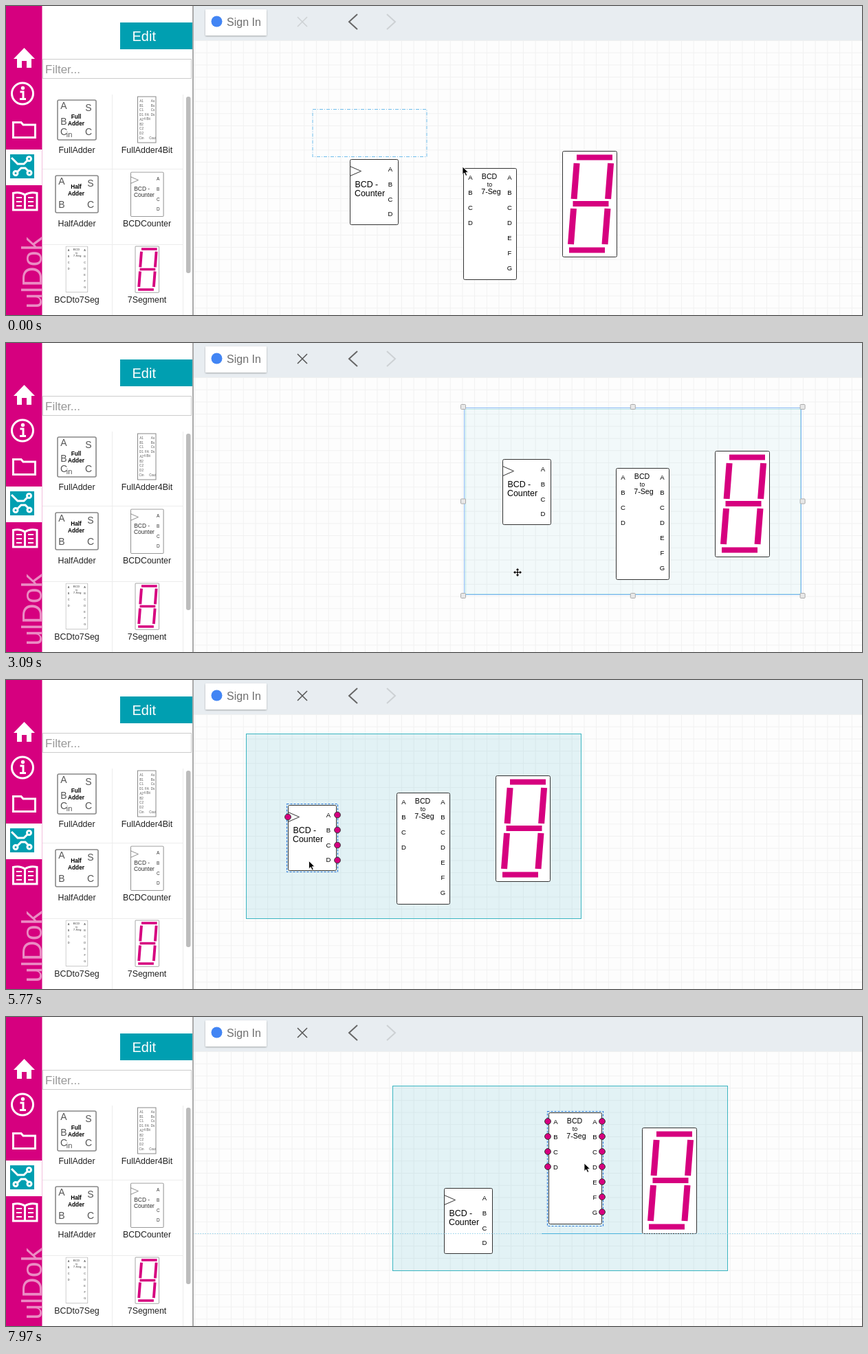
Recreate the animation shown at these times as an HTML page. Size 1245 by 450 pixels, loop 8000 ms.

```html
<!DOCTYPE html>
<html lang="en">
<head>
<meta charset="utf-8">
<title>Circuit editor</title>
<style>
html, body { margin: 0; width: 100%; height: 100%; overflow: hidden; background: #fff; }
svg { display: block; width: 1245px; height: 450px; font-family: "Liberation Sans", Arial, sans-serif; }
.mid { text-anchor: middle; }
.line { fill: none; stroke: #fff; stroke-width: 3; }
.box { fill: #fff; stroke: #333; }
.icon { fill: #fff; stroke: #888; stroke-width: 1.6; }
.port { fill: #d6007f; stroke: #333; }
.dash { fill: none; stroke: #2a78d8; stroke-width: 1.2; stroke-dasharray: 3 2; }
</style>
</head>
<body>
<svg viewBox="0 0 1245 450">
  <defs>
    <pattern id="grid" x="274" y="50" width="17.7" height="17.7" patternUnits="userSpaceOnUse">
      <path d="M.5 0V17.7M0 .5H17.7" stroke="#f1f1f1" fill="none"/>
    </pattern>
    <filter id="shadow" x="-10%" y="-10%" width="120%" height="130%">
      <feDropShadow dx="0" dy="1" stdDeviation="1.2" flood-opacity=".3"/>
    </filter>
    <g id="counter"></g>
    <g id="decoder"></g>
    <g id="display"></g>
  </defs>

  <rect x="272" width="973" height="450" fill="#fdfdfd"/>
  <rect x="272" y="50" width="973" height="400" fill="url(#grid)"/>

  <g id="group">
    <rect id="groupArea" x=".5" y=".5" width="487" height="269" fill="#0a9cb8" stroke="#3bb5c1"/>
    <g id="counterNode"><use href="#counter"/><g id="counterMarks"></g></g>
    <g id="decoderNode"><use href="#decoder"/><rect id="decoderDash" class="dash" x="-2" y="-2" width="81" height="167"/><g id="decoderPorts"></g></g>
    <use href="#display" x="363.5" y="61.5"/>
    <g id="frame"><rect x="-1.5" y="-1.5" width="490" height="272" fill="none" stroke="#80b6f2"/></g>
  </g>
  <rect id="band" x="446" y="150.5" fill="none" stroke="#6fbdec" stroke-dasharray="5 2 1 2"/>
  <g id="guide" stroke="#8fd0ea">
    <path d="M272 0H1244" stroke-dasharray="1.5 2"/>
    <path id="guideSpan" stroke="#4bb4de"/>
  </g>

  <rect x="272" width="973" height="50" fill="#e8edf1"/>
  <rect x="290" y="5" width="89" height="38" rx="1" fill="#fff" filter="url(#shadow)"/>
  <circle cx="306.5" cy="22.5" r="8" fill="#4285f4"/>
  <text x="321" y="29" font-size="16" fill="#6e6e6e">Sign In</text>
  <path id="remove" d="M424 16L438 30M438 16L424 30" stroke-width="1.5"/>
  <path d="M511 12L499 23L511 34" fill="none" stroke="#666" stroke-width="2"/>
  <path d="M554 12L566 23L554 34" fill="none" stroke="#cdd1d4" stroke-width="2"/>

  <rect x="52" width="220" height="450" fill="#fff"/>
  <path d="M272 0V450" stroke="#aaa" stroke-width="2"/>
  <rect x="166" y="24" width="105" height="39" fill="#009fb1"/>
  <text x="183.5" y="51" font-size="20" fill="#fff">Edit</text>
  <rect x="53.5" y="77.5" width="216" height="28" fill="#fff" stroke="#ccc"/>
  <text x="57" y="98" font-size="17" fill="#999">Filter...</text>
  <path d="M154.5 129V450M257.5 129V450M53 237.5H257M53 347.5H257" stroke="#ececec"/>
  <rect x="262" y="132" width="6.5" height="257" rx="3" fill="#bcbcbc"/>
  <g id="palette"></g>

  <rect width="52.5" height="450" fill="#d6007f"/>
  <path d="M11 77L26.5 61L42 77H37V90H30V80H23V90H16V77Z" fill="#fff"/>
  <circle class="line" cx="24" cy="127.5" r="15.5"/>
  <path class="line" stroke-width="4" d="M20.5 125H25V135M20 135.5H29"/>
  <circle cx="24.5" cy="119.5" r="2.7" fill="#fff"/>
  <path class="line" d="M10.5 190V169.5H22L25 173H42.5V191.5H10.5Z"/>
  <rect y="209" width="52.5" height="52" fill="#fff"/>
  <rect x="6" y="216" width="35" height="35" fill="#009fb1"/>
  <g class="line">
    <path d="M8 221L17 230H26L31 225M17 241L22 236H28L32 240"/>
    <circle cx="33.5" cy="222.5" r="3"/><circle cx="14" cy="243.5" r="3"/><circle cx="34" cy="243" r="3"/>
  </g>
  <path class="line" d="M27.5 275Q20 270 10.5 272.5V297H45V272.5Q35 270 27.5 275V297"/>
  <path stroke="#fff" stroke-width="2" d="M15 279H23M15 285H23M15 291H23M32 279H40M32 285H40M32 291H40"/>
  <text transform="translate(52 336) rotate(-90)" text-anchor="end" font-size="41" fill="#eb8cc4">ulDok</text>

  <path id="arrow" stroke="#fff" stroke-width=".8" d="M0 0V11.5L2.7 9L4.7 13.3L6.7 12.4L4.8 8.3H8.5Z"/>
  <path id="mover" stroke="#fff" stroke-width=".8" d="M0-6.5L3-3H1V-1H3V-3L6.5 0L3 3V1H1V3H3L0 6.5L-3 3H-1V1H-3V3L-6.5 0L-3-3V-1H-1V-3H-3Z"/>
</svg>
<script>
const $ = id => document.getElementById(id);
const add = (id, markup) => $(id).insertAdjacentHTML('beforeend', markup);
const repeat = (count, make) => Array.from({ length: count }, (_, i) => make(i)).join('');
const label = (text, x, y, size, extra = '') =>
  `<text class="mid" x="${x}" y="${y}" font-size="${size}" ${extra}>${text}</text>`;
const column = (items, x, y, step, size) =>
  repeat(items.length, i => label(items[i], x, y + i * step, size));
const ports = (count, x, y) =>
  repeat(count, i => `<circle class="port" cx="${x}" cy="${y + i * 22}" r="4.4"/>`);

// Chips
add('counter', `<rect class="box" width="70" height="95" rx="2"/>
  <path d="M0 10L16 17L0 24" fill="none" stroke="#333"/>
  <text x="7" y="40" font-size="12.4">BCD -</text><text x="6.5" y="53" font-size="12.4">Counter</text>`
  + column('ABCD', 58.5, 17.5, 21.8, 9.5));
add('counterMarks', '<rect class="dash" x="-2" y="-2" width="74" height="99"/>'
  + ports(1, -.5, 17) + ports(4, 71.5, 14));
add('decoder', '<rect class="box" width="77" height="162" rx="2"/>'
  + label('BCD', 37.5, 15, 10.6) + label('to', 38, 26.5, 8.8) + label('7-Seg', 40, 37.5, 10.6)
  + column('ABCD', 10, 16.5, 22, 9.5) + column('ABCDEFG', 67, 16.8, 22, 9.5));
add('decoderPorts', ports(4, -1.5, 12.5) + ports(7, 77.5, 12.5));

const bars = repeat(3, i => `M${20.5 - 5.5 * i} ${9 + 67.5 * i}h52`);
const posts = repeat(4, i => {
  const row = i >> 1, col = i % 2;
  return `M${20.6 - 4.6 * row + 49.5 * col} ${17.5 + 66 * row}l-4 52`;
});
add('display', `<rect class="box" width="79" height="154" rx="2"/>
  <g fill="none" stroke="#d6007f"><path stroke-width="8" d="${bars}"/><path stroke-width="9" d="${posts}"/></g>`);

// Eight resize handles around the group
add('frame', repeat(9, i => i === 4 ? '' :
  `<rect x="${-6.5 + 246.8 * (i % 3)}" y="${-6.5 + 137.5 * Math.floor(i / 3)}" width="7" height="7" rx="1" fill="#e8e8e8" stroke="#aaa"/>`));

// Palette
const adder = (x, y, w, h, name, nameY, corner) =>
  `<rect class="icon" x="${x}" y="${y}" width="${w}" height="${h}" rx="2"/><g fill="#555">`
  + label('A', x + 9, y + 13, 14) + label('S', x + w - 11, y + 16, 14)
  + label(corner, x + 9, y + h - 7, 14) + label('C', x + w - 11, y + h - 7, 14) + '</g>'
  + column([name, 'Adder'], x + w / 2 - 1, nameY, 9.5, '8.3" font-weight="bold');
const pins = (text, x) => column(text.split(' '), x, 140, 6.7, 4.6);
const names = ['FullAdder', 'FullAdder4Bit', 'HalfAdder', 'BCDCounter', 'BCDto7Seg', '7Segment'];
add('palette',
  adder(75, 137, 56, 58, 'Full', 164, 'C') + adder(72, 247, 62, 54, 'Half', 266, 'B')
  + '<rect class="icon" style="stroke-width:1" x="191.5" y="132" width="26.5" height="67"/><g fill="#555">'
  + label('B', 84, 173, 14) + label('in', 92, 191, 11)
  + pins('A1 B1 C1 D1 A2 B2 C2 D2 Cin', 197) + pins('As Bs Cs Ds', 213.5)
  + label('Cout', 213, 194, 4.6) + column(['FA', '4 Bit'], 205, 160, 6, 4.8)
  + `</g><g opacity=".8"><use href="#counter" transform="translate(181.5 242) scale(.68)"/>
    <use href="#decoder" transform="translate(87 350) scale(.413)"/></g>
    <use href="#display" transform="translate(188 350) scale(.437)"/>`
  + repeat(6, i => label(names[i], 103 + 102 * (i % 2), [214, 321, 432][i >> 1], 12.4, 'fill="#222"')));

// Key points are [step, x, y], joined by straight moves.
const groupPath = [[17, 446, 150], [21, 668, 96], [23, 640, 68], [26, 448, 102], [28, 349, 78],
  [44, 349, 78], [46, 441, 86], [49, 562, 100]];
const counterPath = [[37, 54.5, 73.5], [39, 61.5, 104.5], [42, 75.5, 149.5]];
const decoderPath = [[51, 219.5, 86.5], [54, 227.5, 39.5]];
const bandPath = [[0, 612, 219], [7, 933, 419]];
const cursorPath = [[0, 664, 234], [7, 980, 421], [10, 980, 421], [14, 589, 389], [16, 522, 388],
  [30, 426, 329], [32, 400, 394], [35, 434, 232], [42, 455, 309], [44, 550, 184],
  [49, 763, 206], [51, 833, 260]];

function along(path, step) {
  const next = path.findIndex(point => point[0] > step);
  if (next <= 0) return path.at(next).slice(1);
  const [[t0, x0, y0], [t1, x1, y1]] = path.slice(next - 1, next + 1);
  const f = (step - t0) / (t1 - t0);
  return [x0 + f * (x1 - x0), y0 + f * (y1 - y0)];
}
const sum = (...points) => points.reduce(([x, y], [dx, dy]) => [x + dx, y + dy]);
const place = (id, [x, y]) => $(id).setAttribute('transform', `translate(${x} ${y})`);
const show = (id, on) => $(id).setAttribute('display', on ? 'inline' : 'none');
const set = (id, values) => Object.entries(values).forEach(([name, value]) => $(id).setAttribute(name, value));

const LOOP = 8000, STEP = 147.6;
function draw(now) {
  const k = Math.floor((now % LOOP + 12) / STEP);
  const within = (from, to) => k >= from && k < to;
  const firstDrag = within(18, 30), dragging = firstDrag || within(45, 49);
  const grouped = k >= 9, counterHeld = within(36, 43), decoderHeld = k >= 51;
  const group = along(groupPath, k), counter = along(counterPath, k), decoder = along(decoderPath, k);

  place('group', group);
  place('counterNode', counter);
  place('decoderNode', decoder);
  set('groupArea', {
    'fill-opacity': !grouped ? 0 : dragging ? .045 : .11,
    'stroke-opacity': !grouped ? 0 : dragging ? .35 : 1
  });
  show('frame', within(17, 33) || within(44, 51));
  show('counterMarks', counterHeld);
  show('decoderDash', decoderHeld);
  show('decoderPorts', decoderHeld || within(13, 16));

  const [right, bottom] = along(bandPath, k);
  show('band', !grouped);
  set('band', { width: right - 446, height: bottom - 150 });

  // Snap guide along the bottom edge of the display
  show('guide', k === 40 || k >= 53);
  place('guide', [0, group[1] + 215.5]);
  set('guideSpan', { d: `M${group[0] + (decoderHeld ? 217 : 65)} 0h${decoderHeld ? 146 : 298}` });

  const selected = within(17, 33) || counterHeld || k >= 44;
  set('remove', { stroke: selected ? '#555' : '#cdd1d4' });

  let cursor = along(cursorPath, k);
  if (dragging) cursor = sum(group, firstDrag ? [76, 238] : [201, 106]);
  if (within(37, 43)) cursor = sum(group, counter, [30, 81]);
  if (decoderHeld) cursor = sum(group, decoder, [51.5, 73.5]);
  show('mover', dragging);
  show('arrow', !dragging);
  place(dragging ? 'mover' : 'arrow', cursor);
}

const start = performance.now();
function tick() {
  draw(performance.now() - start);
  requestAnimationFrame(tick);
}
tick();
</script>
</body>
</html>
```
